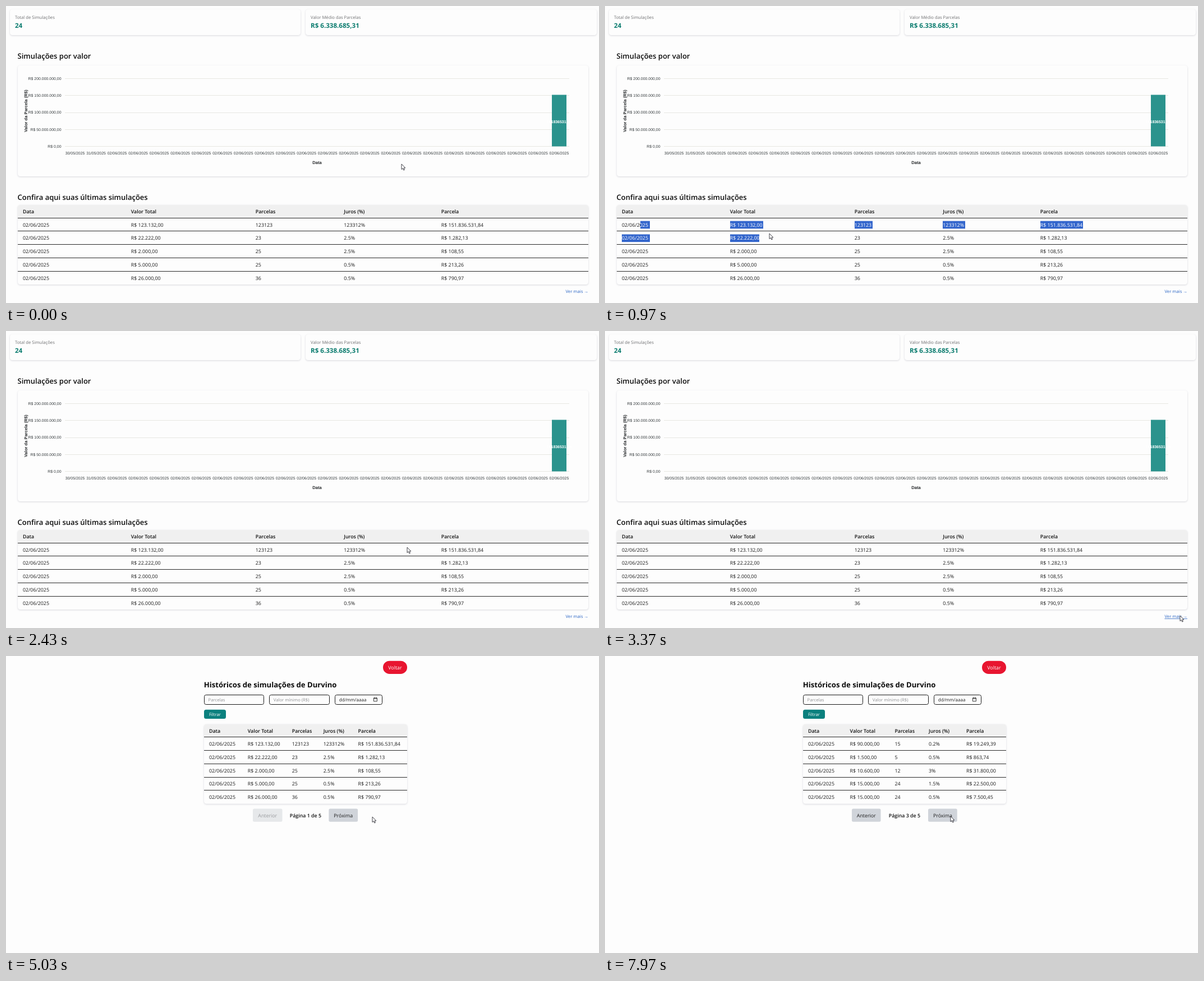
Write an HTML page that moves like this. It is 1057 by 530 pixels and loops after 8 s.

```html
<!DOCTYPE html>
<html lang="pt-BR">
<head>
<meta charset="utf-8">
<title>Simulações</title>
<style>
  html, body { margin: 0; width: 100%; height: 100%; overflow: hidden; background: #fdfdfd; }
  svg { display: block; }
  text { font: 8.85px "Open Sans", "Noto Sans", sans-serif; fill: #1c1c1c; white-space: pre; text-rendering: geometricPrecision; }
  .head { font-weight: 600; fill: #111; }
  .small { font-size: 7.7px; fill: #6f7072; }
  .hint { font-size: 7.7px; fill: #8c8d90; }
  .date { font-size: 8.05px; }
  .total { font-size: 11.6px; font-weight: 700; fill: #0b7c6f; }
  .title { font-size: 13px; font-weight: 600; fill: #0c0c0c; }
  .big { font-size: 13.1px; font-weight: 700; fill: #0c0c0c; }
  .axis { font: 6.94px "Liberation Sans", Arial, sans-serif; fill: #373d3f; }
  .axisTitle { font: bold 7.6px "Liberation Sans", Arial, sans-serif; fill: #26292b; }
  .barLabel { font: bold 6.94px "Liberation Sans", Arial, sans-serif; fill: #fff; }
  .link { font-size: 7.7px; fill: #2b66c4; }
  .light { fill: #fff; }
  .off { fill: #999b9e; }
  .card { fill: #fdfdfd; filter: drop-shadow(0 1.3px 1.4px rgba(20, 20, 50, .16)); }
  .field { fill: #fdfdfd; stroke: #1a1a1a; }
</style>
</head>
<body>
<svg id="stage" width="1057" height="530" viewBox="0 0 1057 530">
  <defs><clipPath id="selClip"></clipPath></defs>
  <rect width="1057" height="530" fill="#fdfdfd"/>
  <g id="dash"></g>
  <g id="history"></g>
  <path id="cursor" d="M0 0V9.6L2.2 7.6L3.8 11L5.4 10.3L3.9 7H6.8Z" fill="#fff" stroke="#23232b" stroke-width=".85" stroke-linejoin="round"/>
</svg>
<script>
const LOOP = 8000;
const $ = id => document.getElementById(id);
const dash = $('dash'), history_ = $('history'), cursor = $('cursor');

function el(parent, tag, attrs = {}) {
  const node = document.createElementNS('http://www.w3.org/2000/svg', tag);
  for (const key in attrs) node.setAttribute(key, attrs[key]);
  return parent.appendChild(node);
}
const rect = (p, x, y, width, height, rx, extra) =>
  el(p, 'rect', { x, y, width, height, rx, ...extra });
const line = (p, x1, x2, y, stroke) =>
  el(p, 'path', { d: `M${x1} ${y}H${x2}`, stroke });
function text(p, str, x, y, cls = '', anchor = 'start') {
  const node = el(p, 'text', { x, y, class: cls, 'text-anchor': anchor });
  node.textContent = str;
  return node;
}

const ROW = 23.8;
const HEADS = ['Data', 'Valor Total', 'Parcelas', 'Juros (%)', 'Parcela'];
const DAY = '02/06/2025';
const PAGES = [
  ['123.132,00|123123|123312|151.836.531,84', '22.222,00|23|2.5|1.282,13',
   '2.000,00|25|2.5|108,55', '5.000,00|25|0.5|213,26', '26.000,00|36|0.5|790,97'],
  ['25.000,00|25|3.2|1.467,88', '30.000,00|25|3.5|1.820,22',
   '70.000,00|75|2.7|2.186,45', '90.000,00|15|0.2|6.096,45', '90.000,00|15|0.2|19.249,39'],
  ['90.000,00|15|0.2|19.249,39', '1.500,00|5|0.5|863,74',
   '10.600,00|12|3|31.800,00', '15.000,00|24|1.5|22.500,00', '15.000,00|24|0.5|7.500,45']
];
const cells = row => {
  const [total, count, rate, part] = row.split('|');
  return [DAY, 'R$ ' + total, count, rate + '%', 'R$ ' + part];
};

function tableFrame(p, x, y, w) {
  rect(p, x, y, w, 142, 4.5, { class: 'card' });
  el(p, 'path', {
    d: `M${x} ${y + 23}V${y + 4.5}q0-4.5 4.5-4.5H${x + w - 4.5}q4.5 0 4.5 4.5V${y + 23}Z`,
    fill: '#f0f0f0'
  });
  for (let i = 0; i < 5; i++) line(p, x, x + w, Math.floor(y + 23 + i * ROW) + .5, '#2a2a2a');
}
function tableRows(p, rows, cols, y, cls) {
  rows.forEach((row, r) => cells(row).forEach((str, c) =>
    text(p, str, cols[c], y + 38.5 + r * ROW, cls)));
}
const tableHeads = (p, cols, y) =>
  HEADS.forEach((str, c) => text(p, str, cols[c], y + 14.8, 'head'));

// Dashboard
rect(dash, 7, 6, 518, 46, 4.5, { class: 'card' });
rect(dash, 534, 6, 519, 46, 4.5, { class: 'card' });
text(dash, 'Total de Simulações', 16, 23.2, 'small');
text(dash, '24', 16, 39, 'total');
text(dash, 'Valor Médio das Parcelas', 543, 23.2, 'small');
text(dash, 'R$ 6.338.685,31', 543, 39, 'total');

text(dash, 'Simulações por valor', 20.6, 94.3, 'title');
rect(dash, 21, 106, 1017, 198, 4.5, { class: 'card' });
['200.000.000', '150.000.000', '100.000.000', '50.000.000', '0'].forEach((v, i) => {
  const y = 129.3 + i * 30.35;
  line(dash, 105, 1004, Math.floor(y) + .5, '#e7e7e2');
  text(dash, `R$ ${v},00`, 98.6, y + 2.3, 'axis', 'end');
});
for (let i = 0; i < 24; i++) {
  const day = i > 1 ? DAY : i ? '31/05/2025' : '30/05/2025';
  text(dash, day, 123 + i * 37.52, 265, 'axis', 'middle');
}
text(dash, 'Data', 554.5, 282, 'axisTitle', 'middle');
text(dash, 'Valor da Parcela (R$)', 0, 0, 'axisTitle', 'middle')
  .setAttribute('transform', 'translate(38 187.3) rotate(-90)');
rect(dash, 973, 158.5, 26, 92, 0, { fill: '#2b938d' });
text(dash, '151836531.84', 986, 208.6, 'barLabel', 'middle');

const COLS = [30, 222.8, 444.8, 602.3, 775.8], TOP = 355;
text(dash, 'Confira aqui suas últimas simulações', 20.6, 346.3, 'title');
tableFrame(dash, 21, TOP, 1017);
tableHeads(dash, COLS, TOP);
tableRows(dash, PAGES[0], COLS, TOP);
const link = text(dash, 'Ver mais →', 1038, 512.2, 'link', 'end');

// Selection: [row, left, width]
const SEL = [[0, 63, 17], [0, 223, 59], [0, 445, 32], [0, 602, 40], [0, 776, 76], [1, 30, 50], [1, 223, 52]];
const selection = el(dash, 'g');
const spans = SEL.map(([row, x, width]) => {
  const make = p => rect(p, x, 383.7 + row * ROW, width, 13.6, 0, { fill: '#3265cc' });
  return { row, x, width, nodes: [make(selection), make($('selClip'))] };
});
tableRows(el(selection, 'g', { 'clip-path': 'url(#selClip)' }), PAGES[0].slice(0, 2), COLS, TOP, 'light');

// History
const H = history_;
rect(H, 672, 8.7, 43, 23.3, 11.6, { fill: '#e81530' });
text(H, 'Voltar', 693.4, 23.6, 'light', 'middle');
text(H, 'Históricos de simulações de Durvino', 352.8, 56, 'big');
[[353, 107], [469, 108], [586, 85]].forEach(([x, w]) =>
  rect(H, x + .5, 69.5, w - 1, 17, 3, { class: 'field' }));
text(H, 'Parcelas', 360.6, 80.7, 'hint');
text(H, 'Valor mínimo (R$)', 476.8, 80.7, 'hint');
text(H, 'dd/mm/aaaa', 593.8, 80.9, 'date');
el(H, 'path', { d: 'M655.4 75H661.4V80.8H655.4ZM655.4 76H661.4M656.7 73.6V75M660.1 73.6V75', fill: 'none', stroke: '#222', 'stroke-width': .9 });
rect(H, 353, 95.7, 39, 16.3, 3.5, { fill: '#0b807e' });
text(H, 'Filtrar', 372.4, 106.7, 'light small', 'middle').style.fill = '#fff';
tableFrame(H, 353, 121.7, 362);

const pages = PAGES.map((rows, i) => {
  const g = el(H, 'g'), first = i === 0;
  const cols = first ? [362, 430.8, 509.7, 565.7, 627.6] : [362, 436.6, 516.4, 577, 644];
  tableHeads(g, cols, 121.7);
  tableRows(g, rows, cols, 121.5);
  const button = (x, w, str, off) => {
    rect(g, x, 272.6, w, 23.2, 2.5, { fill: off ? '#e6e8ea' : '#d0d4da' });
    text(g, str, x + w / 2, 287.6, off ? 'off' : '', 'middle');
  };
  button(440, first ? 52.5 : 51.5, 'Anterior', first);
  text(g, `Página ${i + 1} de 5`, 533.9, 287.6, 'head', 'middle');
  button(first ? 575.4 : 576, 51.7, 'Próxima');
  return g;
});

// Pointer track: [time, x, y]
const TRACK = [
  [0, 705, 282], [30, 705, 282], [560, 63, 391], [630, 63, 391], [970, 293, 406],
  [1250, 380, 409], [1630, 515, 410], [1700, 515, 410], [2100, 715, 386], [2430, 715, 386],
  [2530, 791, 432], [2930, 791, 432], [3370, 1025, 508], [4000, 1025, 508], [4800, 733, 322],
  [4990, 733, 322], [5030, 653, 287], [5800, 653, 287], [5960, 616, 286], [LOOP, 616, 286]
];
function pointer(t) {
  const i = TRACK.findIndex(k => k[0] > t);
  const [t0, x0, y0] = TRACK[i - 1], [t1, x1, y1] = TRACK[i];
  const u = (t - t0) / (t1 - t0), e = u * u * (3 - 2 * u);
  return [x0 + (x1 - x0) * e, y0 + (y1 - y0) * e];
}
const show = (node, on) => node.style.display = on ? '' : 'none';

function draw(t) {
  const [x, y] = pointer(t);
  cursor.setAttribute('transform', `translate(${x} ${y})`);

  const onHistory = t >= 3570;
  show(dash, !onHistory);
  show(history_, onHistory);
  const page = t >= 7230 ? 2 : t >= 6000 ? 1 : 0;
  pages.forEach((g, i) => show(g, i === page));

  link.setAttribute('text-decoration', x > 997 && y > 500 ? 'underline' : 'none');

  const selecting = t >= 630 && t < 1270;
  show(selection, selecting);
  if (!selecting) return;
  const caretRow = y > 402 ? 1 : 0;
  for (const s of spans) {
    const reach = s.row < caretRow ? s.width : s.row > caretRow ? 0 : x - s.x;
    const w = Math.max(0, Math.min(s.width, reach));
    s.nodes.forEach(n => n.setAttribute('width', w));
  }
}

function tick() {
  draw(performance.now() % LOOP);
  requestAnimationFrame(tick);
}
tick();
</script>
</body>
</html>
```
